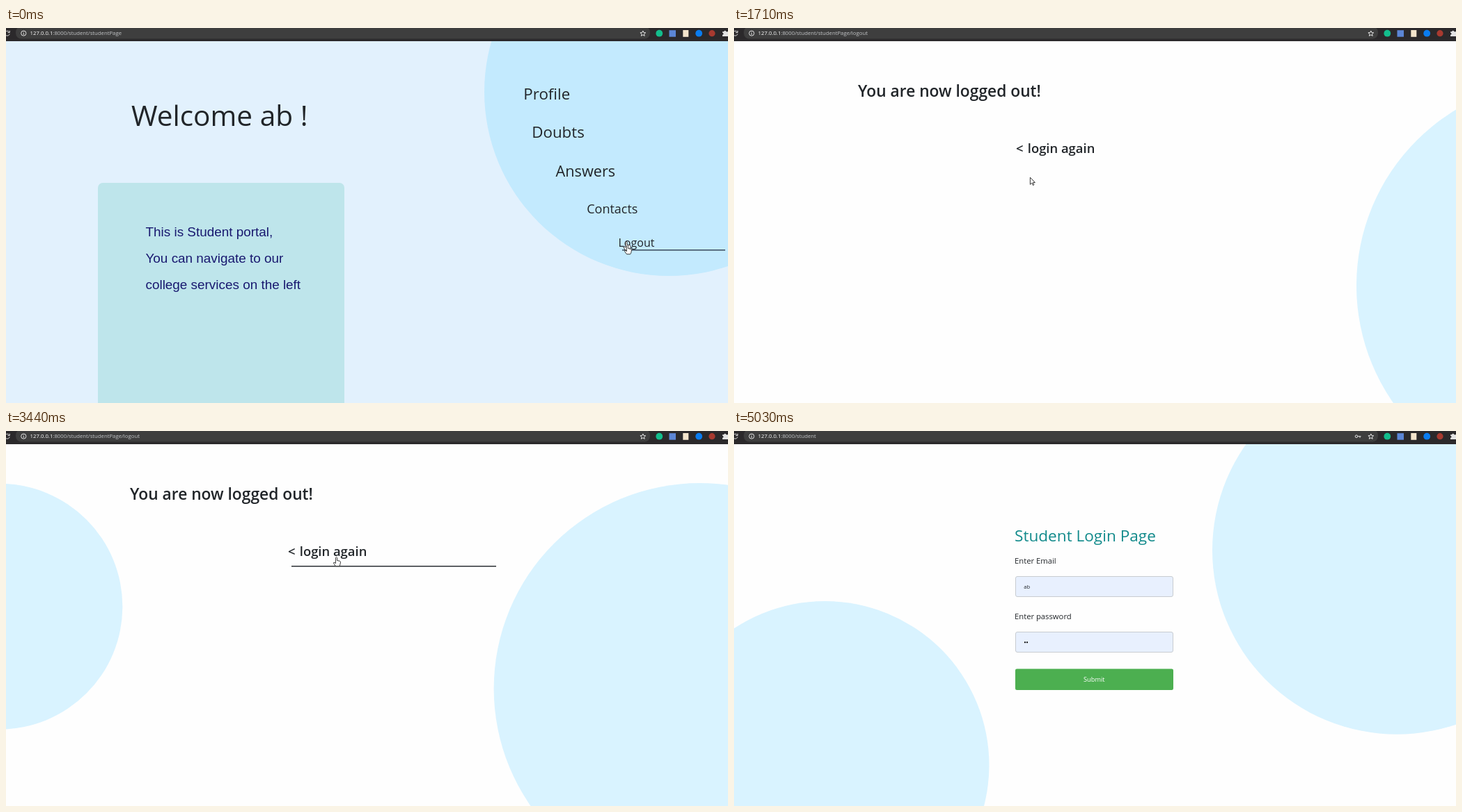
Write an HTML page that moves like this. It is 1037x540 px and loops after 5310 ms.

```html
<!DOCTYPE html>
<html lang="en">
<head>
<meta charset="utf-8">
<title>Student portal logout</title>
<style>
  html, body { margin: 0; width: 100%; height: 100%; overflow: hidden; background: #fefefe; }
  svg { display: block; width: 100%; height: 100%; }
  text { font-family: "Open Sans", "Noto Sans", sans-serif; fill: #212529; white-space: pre; }
  .semi { font-weight: 600; }
  .arial text { font: 18.9px "Liberation Sans", Arial, sans-serif; fill: #191970; }
  .line { fill: none; stroke: #e4e4e4; stroke-width: 1; }
  .pointer { fill: #fff; stroke: #222; stroke-width: .9; stroke-linejoin: round; }
  .field { fill: #e8f0fe; stroke: #c8ccd0; stroke-width: 1; }
</style>
</head>
<body>
<svg viewBox="0 0 1037 540">
  <g id="portal">
    <rect width="1037" height="540" fill="#e2f1fd"/>
    <circle cx="952" cy="92" r="265" fill="#c3eafe"/>
    <rect x="132" y="223" width="354" height="330" rx="7" fill="#bee5eb"/>
    <text x="180" y="140.5" font-size="40.6">Welcome ab !</text>
    <g class="arial">
      <text x="200.5" y="300.3">This is Student portal,</text>
      <text x="200.5" y="338">You can navigate to our</text>
      <text x="200.5" y="375.8">college services on the left</text>
    </g>
    <g font-size="22.3">
      <text x="743.3" y="103">Profile</text>
      <text x="755.2" y="158">Doubts</text>
      <text x="789.5" y="214" font-size="21.7">Answers</text>
      <text x="834.2" y="266.8" font-size="18">Contacts</text>
      <text x="879.5" y="314.8" font-size="16">Logout</text>
    </g>
    <path d="M885 319.7H1033" stroke="#39485a" stroke-width="1.6"/>
  </g>

  <g id="logout">
    <circle id="left" cy="252.7" r="177" fill="#d9f3ff"/>
    <circle id="right" cy="371" r="296" fill="#d9f3ff"/>
    <text class="semi" x="178" y="99" font-size="22.75">You are now logged out!</text>
    <text class="semi" x="405" y="179.5" font-size="18.4">&lt;<tspan dx="1.5"> login again</tspan></text>
    <path id="underline" stroke="#2b2f33" stroke-width="1.6"/>
  </g>

  <g id="login">
    <circle cx="952" cy="171.7" r="265" fill="#d9f3ff"/>
    <circle cx="130.5" cy="481" r="236" fill="#d9f3ff"/>
    <text x="403" y="159" font-size="22.6" style="fill:#118a8b">Student Login Page</text>
    <g font-size="11.25">
      <text x="403" y="190.6">Enter Email</text>
      <text x="403" y="270.8">Enter password</text>
    </g>
    <rect class="field" x="404.5" y="209.5" width="226" height="29" rx="2.5"/>
    <rect class="field" x="404.5" y="289.5" width="226" height="29" rx="2.5"/>
    <text x="416.3" y="227" font-size="7.6">ab</text>
    <circle cx="418" cy="304.3" r="1.15"/>
    <circle cx="421" cy="304.3" r="1.15"/>
    <rect x="404" y="342.5" width="227" height="30.5" rx="2.3" fill="#4caf50"/>
    <text x="517.3" y="361" font-size="9.2" text-anchor="middle" style="fill:#fff">Submit</text>
  </g>

  <g id="bar">
    <rect width="1037" height="19" fill="#2b292b"/>
    <rect x="14" y="-2" width="911" height="17.5" rx="8" fill="#3e3e3e"/>
    <path id="reload" class="line" d="M4.4 5.4A3.4 3.4 0 1 0 5.2 8.6M5.2 3.8V6.6H2.4"/>
    <path id="stop" class="line" d="M-1 4.8L5.2 11M5.2 4.8L-1 11"/>
    <circle class="line" cx="25.3" cy="7.6" r="3.6"/>
    <path class="line" d="M25.3 5.4V6.3M25.3 7.1V9.8"/>
    <text x="34.6" y="10.4" font-size="7.75" style="fill:#fff">127.0.0.1<tspan id="path" fill="#c4c6c8"></tspan></text>
    <g id="key">
      <circle class="line" cx="894" cy="7.7" r="1.8"/>
      <path class="line" d="M896 7.7H900.5M899 7.7V9.8"/>
    </g>
    <path class="line" d="M914.8 4L915.9 6.6 918.7 6.8 916.5 8.6 917.2 11.4 914.8 9.9 912.4 11.4 913.1 8.6 910.9 6.8 913.7 6.6Z"/>
    <circle cx="938.3" cy="7.7" r="4.9" fill="#13bd8c"/>
    <rect x="952.5" y="3.2" width="9.5" height="9.5" fill="#5c86d6"/>
    <rect x="972.3" y="3" width="8" height="9.8" fill="#f3e4cc"/>
    <circle cx="995.2" cy="7.7" r="4.9" fill="#0a7cf0"/>
    <circle cx="1014" cy="7.7" r="4.6" fill="#a83a30"/>
    <path d="M1029 5.2h2.2a1.5 1.5 0 0 1 3 0H1037V12H1029V9.8a1.5 1.5 0 0 0 0-3Z" fill="#e4e4e4"/>
  </g>

  <defs>
    <path id="hand" class="pointer" d="M-1.1 1Q0-.9 1.1 1V5L5 5.8Q6.2 6.2 6 7.8L5.2 11.4 4.2 13.2H-1L-4 9Q-4.2 7.2-2.4 8L-1.1 9.2Z"/>
    <path id="arrow" class="pointer" d="M0 0V10.2L2.4 8 4 11.4 5.5 10.8 4 7.5H7Z"/>
  </defs>
  <use id="ghost" href="#hand" x="891" y="307"/>
  <use id="cursor"/>
</svg>
<script>
const LOOP = 5310;
const STEPS = [0, 120, 310, 460, 580, 750, 870, 990, 1110, 1230, 1350, 1470, 1590, 1710, 1830,
  1950, 2080, 2250, 2420, 2570, 2710, 2860, 3000, 3150, 3290, 3440, 3580, 3720, 3910, 4040, 4170,
  4310, 4430, 4550, 4670, 4790, 4910, 5030];
// Cursor tip: time, x, y
const TRAIL = [[0, 892.5, 312.5], [580, 892.5, 312.5], [1230, 851, 302], [1830, 376, 205],
  [2250, 480, 188], [2570, 474.5, 181.5], [4170, 474.5, 181.5], [4790, 927, 496],
  [4910, 976, 533], [5030, 976, 560]];

const $ = id => document.getElementById(id);
const set = (id, attrs) => { for (const k in attrs) $(id).setAttribute(k, attrs[k]); };
const show = (id, on) => set(id, { visibility: on ? "visible" : "hidden" });
const clamp = v => Math.min(1, Math.max(0, v));
const smooth = p => p * p * (3 - 2 * p);

// The CSS "ease" curve
function ease(p) {
  const curve = (u, a, b) => 3 * (1 - u) ** 2 * u * a + 3 * (1 - u) * u * u * b + u ** 3;
  let lo = 0, hi = 1;
  for (let i = 0; i < 24; i++) {
    const mid = (lo + hi) / 2;
    if (curve(mid, .25, .25) < p) lo = mid; else hi = mid;
  }
  return curve(lo, .1, 1);
}

function tip(t) {
  let i = 0;
  while (i < TRAIL.length - 2 && t >= TRAIL[i + 1][0]) i++;
  const [t0, x0, y0] = TRAIL[i], [t1, x1, y1] = TRAIL[i + 1];
  const p = smooth(clamp((t - t0) / (t1 - t0)));
  return { x: x0 + (x1 - x0) * p, y: y0 + (y1 - y0) * p };
}

function render(t) {
  const loggedOut = t >= 460 && t < 4040;
  show("portal", t < 460);
  show("logout", loggedOut);
  show("login", t >= 4040);
  show("key", t >= 4040);

  const loading = t >= 310 && t < 580 || t >= 3910 && t < 4040;
  show("stop", loading);
  show("reload", !loading);
  $("path").textContent = ":8000/student" +
    (t < 310 ? "/studentPage" : t < 3910 ? "/studentPage/logout" : "");

  const drift = 400 * ease(clamp((t - 460) / 5500));
  set("right", { cx: 1333 - drift });
  set("left", { cx: -346 + drift });

  const grow = ease(clamp((t - 2320) / 400));
  show("underline", loggedOut && grow > 0);
  set("underline", { d: `M410 194.8H${410 + 294 * grow}` });

  const pointing = t < 750 || t >= 2420 && t < 4310;
  set("cursor", { href: pointing ? "#hand" : "#arrow", ...tip(t) });
  show("cursor", t < 5030);
  show("ghost", t < 120);
}

const start = performance.now();
function frame() {
  const t = (performance.now() - start) % LOOP;
  render(STEPS.findLast(s => s <= t));
  requestAnimationFrame(frame);
}
frame();
</script>
</body>
</html>
```
